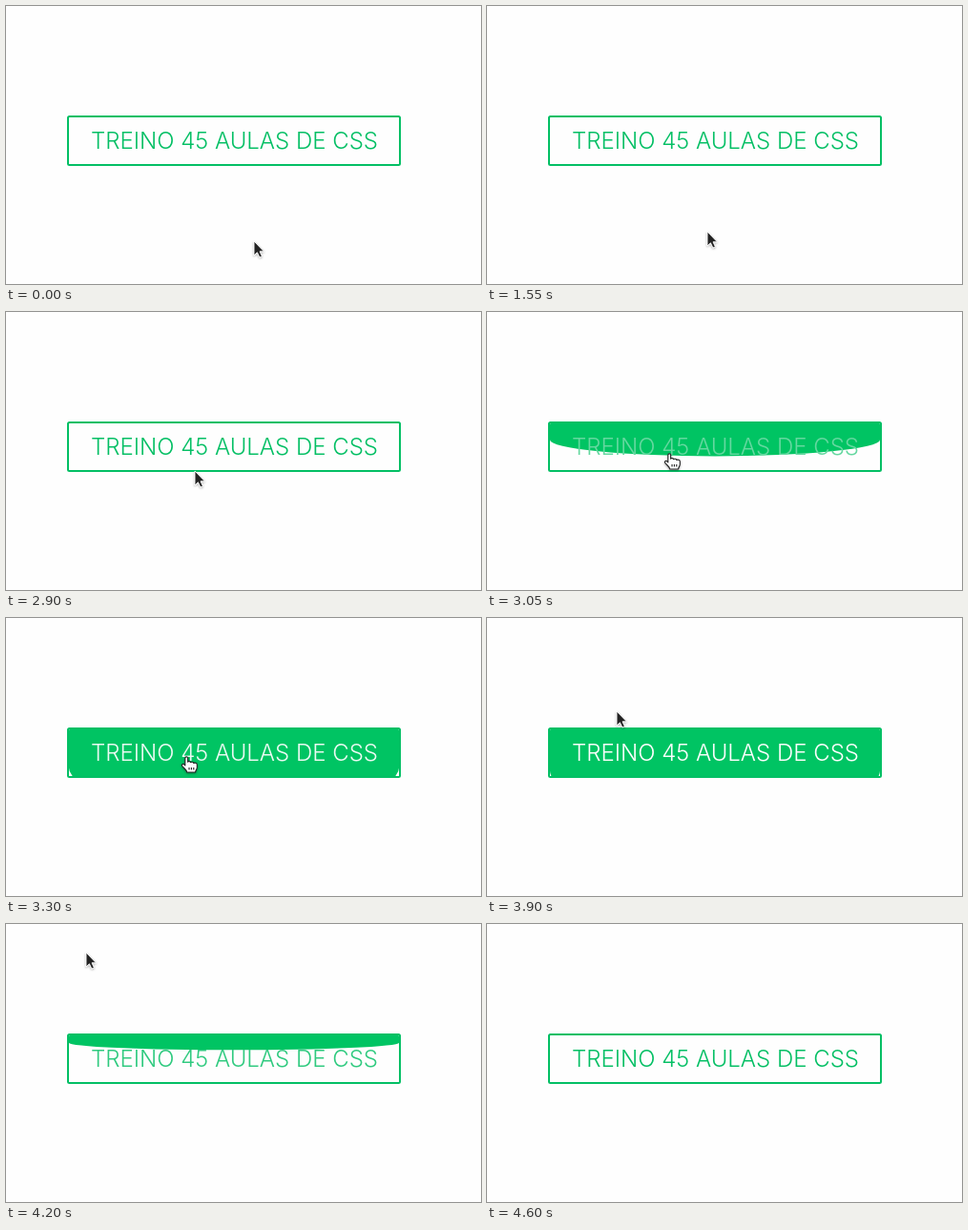
Write an HTML page that moves like this. It is 498x292 px and loops after 5.35 s.

```html
<!DOCTYPE html>
<html lang="pt">
<head>
<meta charset="utf-8">
<title>Botão com preenchimento</title>
<style>
  html, body { margin: 0; width: 100%; height: 100%; overflow: hidden; background: #fefefe; }
  svg { display: block; width: 498px; height: 292px; }
  text { font: 350 24px Inter, "Open Sans", sans-serif; text-anchor: middle; }
</style>
</head>
<body>
<svg viewBox="0 0 498 292">
  <defs>
    <clipPath id="inner"><rect x="66" y="117" width="346" height="49" rx="1"/></clipPath>
    <filter id="shadow" x="-50%" y="-50%" width="200%" height="200%">
      <feDropShadow dx="0" dy="1" stdDeviation="0.8" flood-opacity="0.35"/>
    </filter>
  </defs>
  <path id="fill" fill="#00c463" clip-path="url(#inner)"/>
  <rect x="65" y="116" width="348" height="51" rx="1.5" fill="none" stroke="#03bf64" stroke-width="2"/>
  <text id="label" x="239.5" y="150.3">TREINO 45 AULAS DE CSS</text>
  <g id="cursor" filter="url(#shadow)">
    <path id="arrow" d="M0 0V15L3.4 11.8 5.9 17 8.4 15.9 6 10.8H10.4Z"
      fill="#222" stroke="#fff" stroke-width="0.9"/>
    <path id="hand" d="M-1.2 9V1.2C-1.2 -.6 1.6 -.6 1.6 1.2V5.2C2.2 4.2 4.4 4.4 4.7 5.7C5.4 4.9 7.4 5.1 7.8 6.5C8.6 5.8 11.3 6 11.3 8V11C11.3 13.2 9.6 14 9.6 16H.6C.4 13.2 -2 12.4 -4.2 9.6C-5.4 8 -3.6 6.7 -2.2 7.9ZM3 11V13.5M5.4 11V13.5M7.8 11V13.5"
      fill="#fff" stroke="#222" stroke-width="1.1" stroke-linejoin="round"/>
  </g>
</svg>
<script>
const LOOP = 5350, STEP = 50;
const ENTER = 2905, LEAVE = 3885, FADE = 600, GONE = 4600;
const GREEN = [3, 191, 100], WHITE = [255, 255, 255];
const $ = id => document.getElementById(id);
const fill = $("fill"), label = $("label"), cursor = $("cursor"), arrow = $("arrow"), hand = $("hand");

// Pointer stops: time, x, y. Jumps hold until the next stop; glides are joined.
const jumps = [
  [0, 260, 247], [1550, 231, 237], [1700, 226, 234], [1800, 221, 231],
  [1900, 217, 228], [2400, 216, 225], [2500, 211, 221]
];
const glides = [
  [2650, 211, 221], [2700, 210, 216], [2800, 205, 195], [2900, 198, 167],
  [3000, 193, 153], [3050, 191, 149], [3200, 189, 146], [3750, 189, 146],
  [3800, 177, 136], [3900, 136, 98], [4000, 106, 62], [4100, 90, 39],
  [4200, 84, 30], [4300, 84, 30], [4550, 74, 7], [GONE, 74, 7]
];

const mix = (a, b, k) => a + (b - a) * k;

function pointerAt(t) {
  if (t < glides[0][0]) {
    const [, x, y] = jumps.filter(p => p[0] <= t).pop();
    return [x, y];
  }
  const i = glides.findIndex(p => p[0] > t);
  if (i < 0) return null;
  const a = glides[i - 1], b = glides[i];
  const k = (t - a[0]) / (b[0] - a[0]);
  return [mix(a[1], b[1], k), mix(a[2], b[2], k)];
}

// CSS "ease": cubic-bezier(.25, .1, .25, 1)
function ease(x) {
  if (x <= 0) return 0;
  if (x >= 1) return 1;
  const bez = (a, b, u) => 3 * a * u * (1 - u) ** 2 + 3 * b * u * u * (1 - u) + u ** 3;
  let lo = 0, hi = 1;
  for (let i = 0; i < 24; i++) {
    const mid = (lo + hi) / 2;
    if (bez(.25, .25, mid) < x) lo = mid; else hi = mid;
  }
  return bez(.1, 1, lo);
}

function draw(now) {
  const t = Math.floor(now % LOOP / STEP) * STEP;
  const hover = ease((t - ENTER) / FADE) - ease((t - LEAVE) / FADE);

  const r = 49 * 1.8 * hover / 2;
  fill.setAttribute("d", hover > 0.002
    ? `M66 117H412V${117 + r}A173 ${r} 0 0 1 66 ${117 + r}Z` : "");
  label.style.fill = `rgb(${GREEN.map((c, i) => Math.round(mix(c, WHITE[i], hover)))})`;

  const pos = pointerAt(t);
  cursor.style.display = pos ? "" : "none";
  if (pos) {
    cursor.setAttribute("transform", `translate(${pos.map(Math.round)})`);
    const over = t > ENTER && t < LEAVE;
    hand.style.display = over ? "" : "none";
    arrow.style.display = over ? "none" : "";
  }
}

const start = performance.now();
function tick() {
  draw(performance.now() - start);
  requestAnimationFrame(tick);
}
tick();
</script>
</body>
</html>
```
